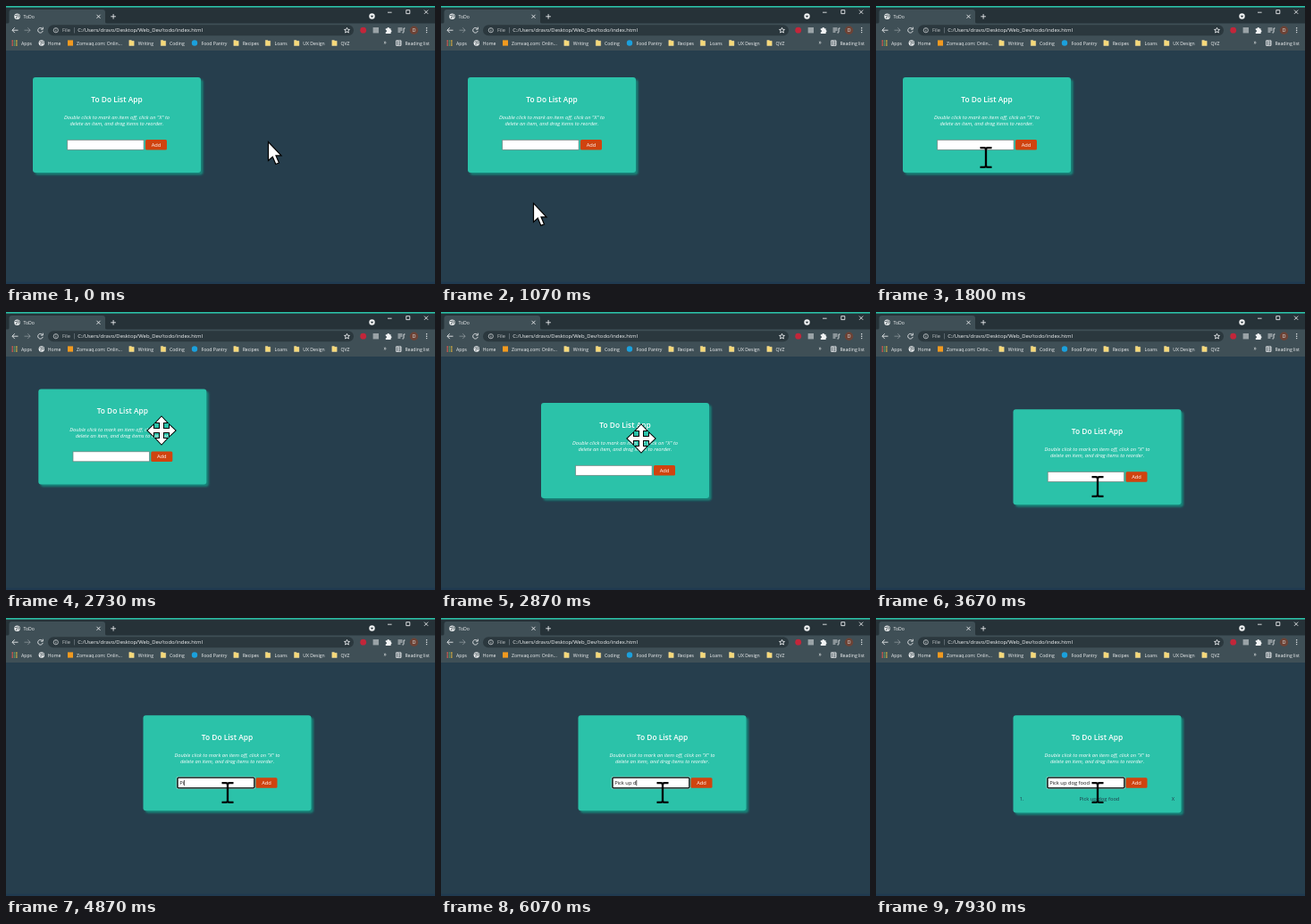
An HTML page that plays this animation: 480 px wide and 312 px high, repeating every 8 s.

```html
<!DOCTYPE html>
<html lang="en">
<head>
<meta charset="utf-8">
<title>ToDo</title>
<style>
  html, body { margin: 0; width: 100%; height: 100%; overflow: hidden; background: #263e4d; }
  svg { display: block; width: 480px; height: 312px; }
  text { font-family: "Open Sans", "Noto Sans", sans-serif; font-size: 5.15px; fill: #f1f3f4; white-space: pre; }
  .page text { font-size: 5.75px; fill: #fff; text-anchor: middle; }
  .page .title { font-size: 8.4px; font-weight: 600; }
  .page .hint { font-style: italic; }
  .page .dark { fill: #203b49; }
  .page #typed { fill: #111; text-anchor: start; }
  .line { fill: none; stroke: #e8eaed; stroke-width: .9; }
</style>
</head>
<body>
<svg viewBox="0 0 480 312" xmlns="http://www.w3.org/2000/svg">
  <defs>
    <filter id="soft" x="-5%" y="-5%" width="110%" height="115%"><feGaussianBlur stdDeviation=".8"/></filter>
    <g id="globe">
      <circle r="3.2" fill="#f1f3f4"/>
      <path d="M-2.4-1.2 0-1.7.4-.2-1 .6-.6 2.3M1-2.5 2.3-.6 1.2 1.4" fill="none" stroke="#4a575d" stroke-width=".9"/>
    </g>
    <path id="folder" d="M-2.7-3h2.4l.8.8h2.2v5.2h-5.4z" fill="#f6d978" stroke="#fbe9ae" stroke-width=".4"/>
    <path id="arm" d="M-2-2V-9H-6L0-15.4 6-9H2V-2z"/>
  </defs>

  <rect width="480" height="312" fill="#263e4d"/>
  <rect y="309.5" width="480" height="2.5" fill="#203a50"/>

  <!-- browser frame -->
  <rect width="480" height="21" fill="#263238"/>
  <rect width="480" height="1.6" fill="#2bbfa6"/>
  <rect y="19.5" width="480" height="30.5" fill="#3f4f56"/>
  <path d="M1 20q2.5 0 2.5-2.5V7q0-3 3-3H108q3 0 3 3v10.5q0 2.5 2.5 2.5z" fill="#3f4f56"/>
  <use href="#globe" x="12.5" y="11.8"/>
  <text x="19.5" y="13.8">ToDo</text>
  <path class="line" d="m101.5 9.8 4 4m0-4-4 4M117.3 11.8h5.6m-2.8-2.8v5.6"/>
  <circle cx="409.5" cy="11.5" r="3.2" fill="#f1f3f4"/>
  <path d="M407.8 10.7h3.4l-1.7 2.2z" fill="#263238"/>
  <path class="line" d="M427 7.2h4.6M447.8 4.6h4v4h-4zM468 4.6l4.2 4.2m0-4.2-4.2 4.2"/>

  <rect x="47" y="21.2" width="342" height="12" rx="6" fill="#2b383e"/>
  <path class="line" d="M13.5 27.2H7m2.8-2.9L6.9 27.2l2.9 2.9"/>
  <path class="line" opacity=".4" d="M20.5 27.2H27m-2.8-2.9 2.9 2.9-2.9 2.9"/>
  <path class="line" d="M40.6 25.4a2.8 2.8 0 1 0 .6 2.5M41.3 23.7v2.4h-2.5"/>
  <g opacity=".75">
    <circle class="line" cx="55.8" cy="27.2" r="2.6" stroke-width=".7"/>
    <path class="line" d="M55.8 26.8v1.8m0-3.2v.7"/>
    <text x="63" y="29.3" style="font-size:5.7px">File</text>
  </g>
  <path d="M76.5 24v6.4" stroke="#7d898f" stroke-width=".6"/>
  <text x="80.3" y="29.3" style="font-size:5.9px">C:/Users/dravo/Desktop/Web_Dev/todo/index.html</text>
  <path class="line" stroke-width=".7" d="m381.500 24.300.85 2 2.150.15-1.650 1.400.55 2.150-1.900-1.150-1.900 1.150.55-2.150-1.650-1.400 2.150-.15z"/>
  <circle cx="399.7" cy="27.2" r="3.4" fill="#c3263a"/>
  <rect x="410.6" y="24" width="6.4" height="6.4" fill="#9aa3a7"/>
  <path d="M424.8 25.200h1.600a1.300 1.300 0 0 1 2.600 0h1.600v1.700a1.300 1.300 0 0 1 0 2.500v1.600h-5.800v-1.700a1.200 1.200 0 0 0 0-2.400z" fill="#f1f3f4"/>
  <path class="line" d="M438.500 25h5m-5 2h5m-5 2h3M445 25v4.500m-1.600.4h1.500M445 25h1.500"/>
  <circle cx="456.500" cy="27.200" r="4.700" fill="#6d4336"/>
  <text x="456.500" y="29.100" text-anchor="middle">D</text>
  <g fill="#f1f3f4"><circle cx="470.700" cy="24.800" r=".7"/><circle cx="470.700" cy="27.200" r=".7"/><circle cx="470.700" cy="29.600" r=".7"/></g>

  <g id="bookmarks"></g>
  <text x="422.500" y="43.300" style="font-size:6.500px">»</text>
  <path class="line" stroke-width=".8" d="M436.600 38.800h5.400v5.600h-5.400zM438.400 38.800v5.600M438.400 40.600h3.600m-3.600 2h3.600"/>
  <text x="446.400" y="43.500">Reading list</text>

  <!-- to-do card, laid out at its starting place -->
  <g id="card" class="page">
    <rect id="shadow" x="32.500" y="82.500" width="188" height="107" rx="3" fill="#178479" filter="url(#soft)"/>
    <rect id="panel" x="30" y="80" width="188" height="107" rx="3" fill="#2bc2a9"/>
    <text class="title" x="124" y="107.500">To Do List App</text>
    <text class="hint" x="124" y="127">Double click to mark an item off, click on "X" to</text>
    <text class="hint" x="124" y="134.200">delete an item, and drag items to reorder.</text>
    <rect x="68.700" y="150.300" width="85.400" height="11" fill="#fff" stroke="#71807d" stroke-width=".7"/>
    <g id="focus" fill="none">
      <rect x="67.600" y="149.200" width="87.600" height="13.200" rx="1.500" stroke="#fff" stroke-width=".6"/>
      <rect x="68.400" y="150" width="86" height="11.600" rx="1" stroke="#101010" stroke-width="1.300"/>
    </g>
    <text id="typed" x="70.700" y="157.800"></text>
    <path id="caret" d="M0 152.800v6.200" stroke="#111" stroke-width=".7"/>
    <rect x="156" y="150" width="24" height="11.500" rx="1.500" fill="#d0430f"/>
    <text x="168" y="157.900">Add</text>
    <g id="item">
      <text class="dark" x="39.700" y="175.500">1.</text>
      <text class="dark" x="126.500" y="175.500">Pick up dog food</text>
      <text class="dark" x="209" y="175.500">X</text>
    </g>
  </g>

  <!-- pointers -->
  <g id="arrow">
    <path d="M.5.500V21.500L5.300 17.200 8.800 25.500 12.500 24 9 15.900H15z" fill="#fff" stroke="#000" stroke-width="1.200"/>
  </g>
  <g id="beam">
    <path d="M-6.500-10.800h4.500q2 0 2 1.500 0-1.500 2-1.500h4.500M-6.500 10.800h4.500q2 0 2-1.500 0 1.500 2 1.500h4.500M0-9.500v19" fill="none" stroke="#000" stroke-width="2.300"/>
  </g>
  <g id="move"></g>
</svg>
<script>
const LOOP = 8000, STEP = 1000 / 15;
const $ = id => document.getElementById(id);
const show = (node, on) => node.setAttribute('display', on ? 'inline' : 'none');

const icons = {
  globe: x => `<use href="#globe" x="${x}" y="41.500"/>`,
  folder: x => `<use href="#folder" x="${x}" y="41.500"/>`,
  orange: x => `<rect x="${x - 3}" y="38.400" width="6" height="6.200" fill="#f29a1f"/>`,
  blue: x => `<circle cx="${x}" cy="41.500" r="3.200" fill="#1ba0dc"/>`,
  grid: x => [0, 1, 2, 3, 4, 5, 6, 7, 8].map(i =>
    `<rect x="${x - 3 + i % 3 * 2.3}" y="${38.5 + Math.floor(i / 3) * 2.3}" width="1.500" height="1.500"
      fill="${['#e8594c', '#58a66a', '#e8b53f'][i % 3]}"/>`).join('')
};
$('bookmarks').innerHTML = [
  ['grid', 9.5, 17, 'Apps'], ['globe', 39.8, 46.8, 'Home'], ['orange', 72, 79, 'Zomvaq.com: Onlin...'],
  ['folder', 140.5, 147.8, 'Writing'], ['folder', 176, 183, 'Coding'], ['blue', 211, 218.5, 'Food Pantry'],
  ['folder', 257.5, 264.7, 'Recipes'], ['folder', 293, 300.5, 'Loans'], ['folder', 325.2, 332.3, 'UX Design'],
  ['folder', 367.5, 374.5, 'QVZ']
].map(([icon, ix, x, label]) => icons[icon](ix) + `<text x="${x}" y="43.500">${label}</text>`).join('');

const arms = [0, 90, 180, 270].map(a => `<use href="#arm" transform="rotate(${a})"/>`).join('');
$('move').innerHTML = `<g fill="#fff" stroke="#000" stroke-width="2">${arms}</g>
  <g fill="#fff">${arms}<rect x="-2" y="-2" width="4" height="4"/></g>`;

// [ms, x, y, pointer]
const pointerPath = [
  [0, 293, 152, 'arrow'], [133, 142, 229, 'arrow'], [600, 142, 229, 'arrow'], [800, 66, 216, 'arrow'],
  [930, 34, 228, 'arrow'], [1200, 170, 214, 'arrow'], [1400, 202, 196, 'arrow'], [1467, 199, 181, 'move'],
  [1600, 199, 181, 'move'], [1733, 140, 173, 'beam'], [1800, 123, 170, 'beam'], [1933, 117, 160, 'beam'],
  [2067, 116, 132, 'move'], [2133, 124, 119, 'move'], [2333, 168, 127, 'move'], [2667, 168, 127, 'move'],
  [2733, 174, 133, 'move'], [2867, 224, 142, 'move'], [3000, 270, 150, 'move'], [3067, 288, 155, 'move'],
  [3200, 288, 156, 'move'], [3467, 262, 180, 'move'], [3533, 255, 190, 'beam'], [3667, 248, 196, 'beam']
];
const cardPath = [
  [2600, 0, 0], [2667, 1, 1], [2733, 6.3, 6.5], [2867, 82, 22], [2933, 112, 28], [3000, 122.5, 29.2], [3067, 123.5, 29.2]
];
const text = 'Pick up dog food';
const keyTimes = [4667, 4867, 5000, 5133, 5333, 5467, 5600, 5800, 6067, 6200, 6333, 6467, 6867, 7000, 7133, 7267];
const FOCUS = 3933, ADDED = 7533;

function along(path, t) {
  let i = 0;
  while (i < path.length - 1 && path[i + 1][0] <= t) i++;
  const a = path[i], b = path[i + 1];
  if (!b || t <= a[0]) return { x: a[1], y: a[2], kind: a[3] };
  const p = (t - a[0]) / (b[0] - a[0]);
  return { x: a[1] + (b[1] - a[1]) * p, y: a[2] + (b[2] - a[2]) * p, kind: a[3] };
}

function draw(ms) {
  const t = Math.round(Math.floor(ms / STEP + .06) * STEP);

  const card = along(cardPath, t);
  $('card').setAttribute('transform', `translate(${card.x} ${card.y})`);
  const added = t >= ADDED, height = added ? 109.2 : 107;
  $('panel').setAttribute('height', height);
  $('shadow').setAttribute('height', height);
  show($('item'), added);

  const count = keyTimes.filter(k => k <= t).length;
  const lastKey = count ? keyTimes[count - 1] : FOCUS;
  $('typed').textContent = text.slice(0, count);
  const focused = t >= FOCUS;
  show($('focus'), focused);
  show($('caret'), focused && (t - lastKey) % 1000 < 500);
  const width = count ? $('typed').getComputedTextLength() : 0;
  $('caret').setAttribute('transform', `translate(${71 + width} 0)`);

  const pointer = along(pointerPath, t);
  for (const kind of ['arrow', 'beam', 'move']) show($(kind), kind === pointer.kind);
  $(pointer.kind).setAttribute('transform', `translate(${pointer.x} ${pointer.y})`);
}

const start = performance.now();
function tick() {
  draw((performance.now() - start) % LOOP);
  requestAnimationFrame(tick);
}
tick();
</script>
</body>
</html>
```
